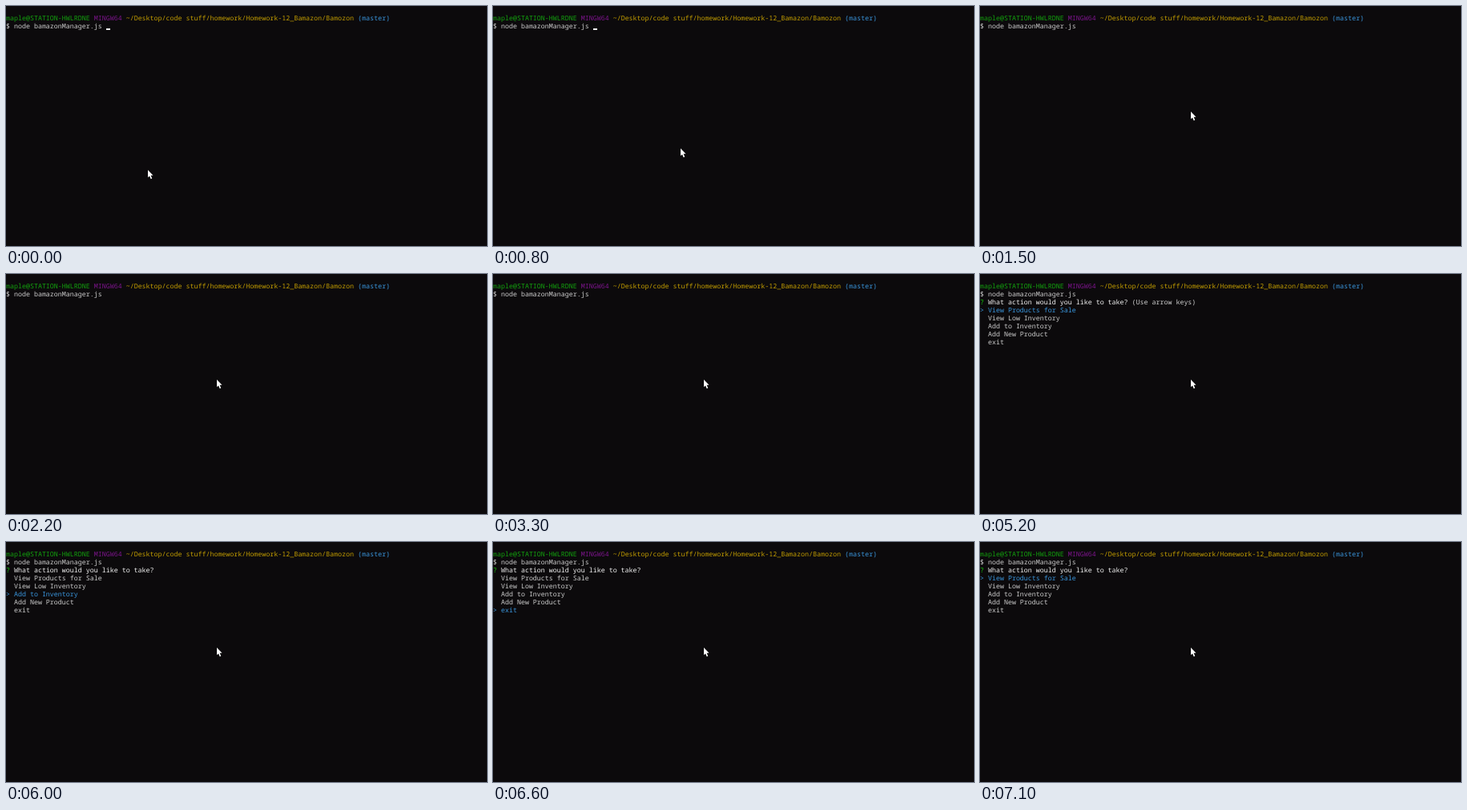
These frames come from a looping animation (600x300 px, 8 s). An HTML page:

```html
<!DOCTYPE html>
<html lang="en">
<head>
<meta charset="utf-8">
<title>Terminal menu</title>
<style>
  html, body { margin: 0; width: 100%; height: 100%; overflow: hidden; background: #0c0a0c; }
  pre {
    position: absolute; left: 0; top: 11px; margin: 0;
    font: 500 8.325px/10px "Noto Sans Mono", "DejaVu Sans Mono", monospace;
    text-rendering: geometricPrecision;
    color: #ccc;
  }
  .green { color: #13a10e; }
  .mark { color: #16c60c; }
  .purple { color: #7c158b; }
  .yellow { color: #c19c00; }
  .blue { color: #3a96dd; }
  .white { color: #f2f2f2; }
  #caret { position: absolute; width: 5px; height: 2px; background: #f2f2f2; }
  #pointer { position: absolute; left: 0; top: 0; width: 8px; height: 13px; }
</style>
</head>
<body>
<pre><span class="green">maple@STATION-HWLRDNE</span> <span class="purple">MINGW64</span> <span class="yellow">~/Desktop/code stuff/homework/Homework-12_Bamazon/Bamozon</span> <span class="blue">(master)</span>
$ node bamazonManager.js
<span id="menu"></span></pre>
<div id="caret"></div>
<svg id="pointer" viewBox="0 0 8 13"><path fill="#fff" d="M0 0V9.2L2 7.4 3.7 11.2 5.2 10.5 3.6 6.8H6.5Z"/></svg>
<script>
const LOOP = 8000, STEP = 100;
const ENTER = 3300, MENU_START = 4200;
const choices = ["View Products for Sale", "View Low Inventory", "Add to Inventory", "Add New Product", "exit"];
const keyPresses = [5600, 6000, 6300, 6600, 6900];
const blinkTimes = [100, 600, 1100, 1700, 2200, 2800, ENTER];
const path = [[500, 177, 205], [800, 234, 178], [1000, 250, 161], [1200, 259, 144], [1500, 263, 132]];

const menu = document.getElementById("menu");
const caret = document.getElementById("caret");
const pointer = document.getElementById("pointer");
const countPassed = (times, t) => times.filter(time => time <= t).length;
const paint = (color, text) => `<span class="${color}">${text}</span>`;

function pointerAt(t) {
  const next = path.findIndex(point => point[0] > t);
  if (next === 0) return path[0].slice(1);
  if (next < 0) return path.at(-1).slice(1);
  const [t0, x0, y0] = path[next - 1], [t1, x1, y1] = path[next];
  const k = (t - t0) / (t1 - t0);
  return [x0 + (x1 - x0) * k, y0 + (y1 - y0) * k].map(Math.round);
}

function menuAt(t) {
  if (t < MENU_START) return "";
  const presses = countPassed(keyPresses, t);
  const hint = presses ? "" : " (Use arrow keys)";
  const rows = choices.map((choice, i) =>
    i === presses % choices.length ? paint("blue", "&gt; " + choice) : "  " + choice);
  return [paint("mark", "?") + paint("white", " What action would you like to take?") + hint, ...rows].join("\n");
}

function placeCaret(t) {
  const typing = t < ENTER;
  const visible = typing ? countPassed(blinkTimes, t) % 2 === 0 : t >= 3700 && t < MENU_START;
  caret.style.left = typing ? "125px" : "0";
  caret.style.top = typing ? "28px" : "38px";
  caret.hidden = !visible;
}

let shownMenu = "";
function draw() {
  const t = Math.floor(performance.now() % LOOP / STEP) * STEP;
  const html = menuAt(t);
  if (html !== shownMenu) menu.innerHTML = shownMenu = html;
  placeCaret(t);
  const [x, y] = pointerAt(t);
  pointer.style.transform = `translate(${x}px, ${y}px)`;
  requestAnimationFrame(draw);
}
draw();
</script>
</body>
</html>
```
